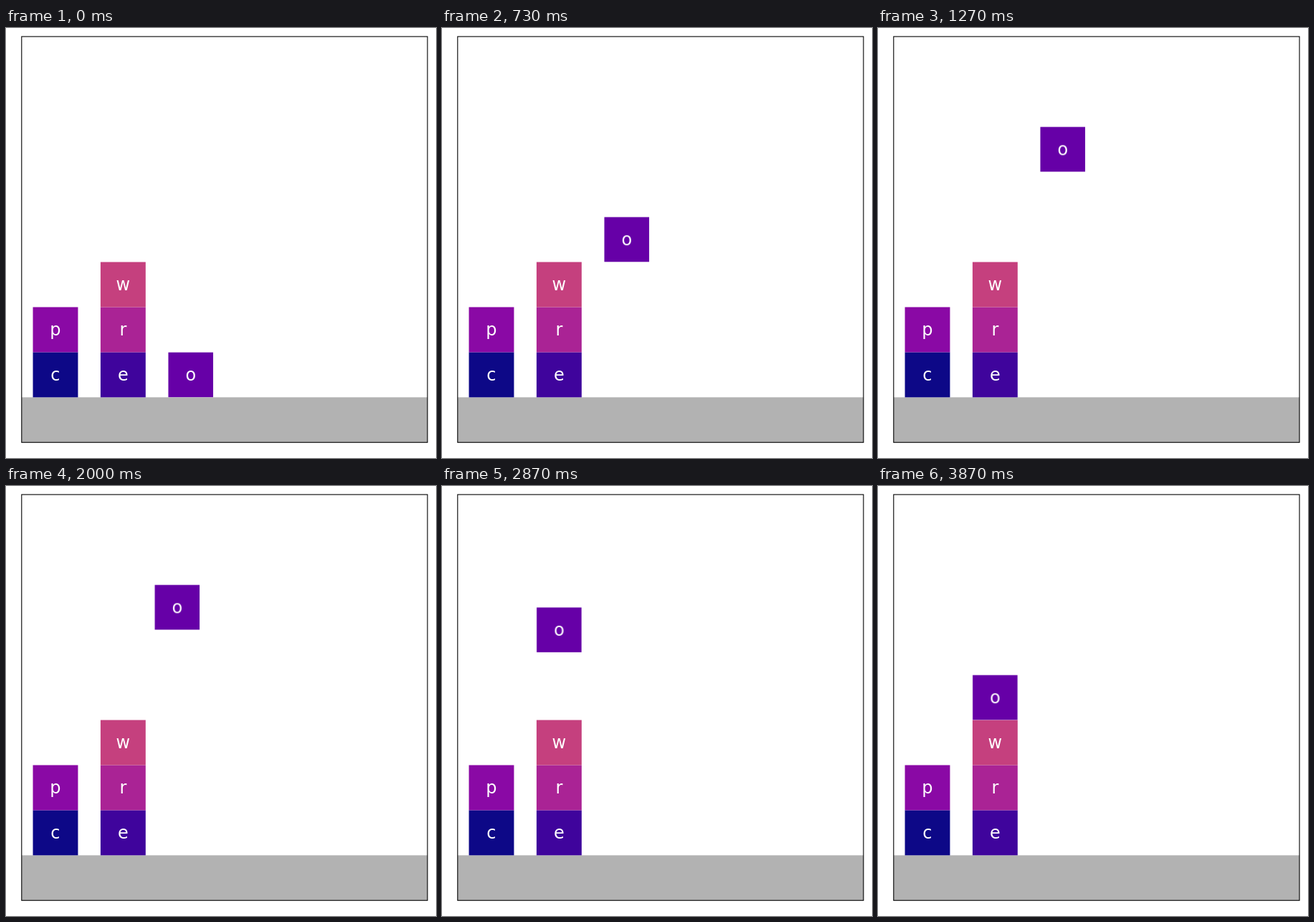
An HTML page for the animation above (3.94 s loop, 600 by 600 pixels).

```html
<!DOCTYPE html>
<html lang="en">
<head>
<meta charset="utf-8">
<title>Stacking blocks</title>
<style>
  html, body { margin: 0; width: 100%; height: 100%; overflow: hidden; background: #fff; }
  svg { display: block; width: 600px; height: 600px; }
  rect { width: 62.92px; height: 62.92px; }
  .ground { width: 566.28px; fill: #b2b2b2; }
  .frame { width: 566.28px; height: 566.28px; fill: none; stroke: #000; stroke-width: 1.1; }
  text { font: 24px "DejaVu Sans", sans-serif; fill: #fff; text-anchor: middle; }

  /* 15 steps a second: lift by quarter blocks, then shift and lower by tenths */
  .mover { animation: stack 3940ms infinite; }
  @keyframes stack {
    0%     { transform: translate(0, 0); animation-timing-function: step-end; }
    1.6%   { transform: translate(0, -31.46px); animation-timing-function: steps(18, end); }
    32.05% { transform: translate(0, -314.6px); animation-timing-function: step-end; }
    50.65% { transform: translate(-18.876px, -314.6px); animation-timing-function: steps(8, end); }
    64.19% { transform: translate(-94.38px, -314.6px); animation-timing-function: steps(20, end); }
    98.03%, 100% { transform: translate(-94.38px, -188.76px); animation-timing-function: step-end; }
  }
</style>
</head>
<body>
<svg viewBox="0 0 600 600">
  <rect class="ground" x="21.8" y="515.32"/>
  <g transform="translate(37.53 452.4)"><rect fill="#0d0887"/><text x="31.46" y="39.2">c</text></g>
  <g transform="translate(37.53 389.48)"><rect fill="#8a09a5"/><text x="31.46" y="39.2">p</text></g>
  <g transform="translate(131.91 452.4)"><rect fill="#3f049c"/><text x="31.46" y="39.2">e</text></g>
  <g transform="translate(131.91 389.48)"><rect fill="#aa2395"/><text x="31.46" y="39.2">r</text></g>
  <g transform="translate(131.91 326.56)"><rect fill="#c5407e"/><text x="31.46" y="39.2">w</text></g>
  <g transform="translate(226.29 452.4)">
    <g class="mover"><rect fill="#6600a7"/><text x="31.46" y="39.2">o</text></g>
  </g>
  <rect class="frame" x="21.8" y="11.96"/>
</svg>
</body>
</html>
```
